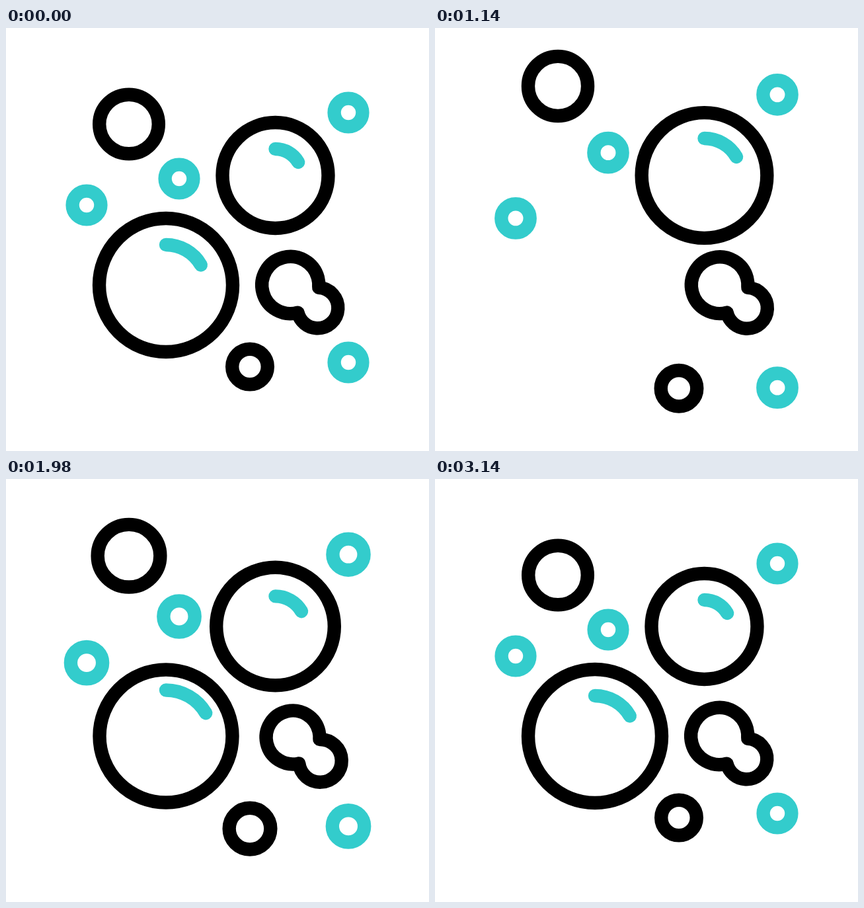
Write an HTML page with a canvas that moves like this. It is 640 px wide and 640 px high and loops after 3.6 s.

```html
<!DOCTYPE html>
<html lang="en">
<head>
<meta charset="utf-8">
<title>Bubbles</title>
<style>
  html, body { margin: 0; width: 100%; height: 100%; overflow: hidden; background: #fff; }
  canvas { display: block; width: 100vw; height: 100vh; }
</style>
</head>
<body>
<canvas id="stage" width="640" height="640"></canvas>
<script>
const ctx = document.getElementById('stage').getContext('2d');
const LOOP = 3600, STEP = 20, STROKE = 20.4;
const BLACK = '#000', TEAL = '#33cccc';
const RAD = Math.PI / 180;

// Eased value between [time, value] keys, held outside them
function track(t, keys) {
  if (t <= keys[0][0]) return keys[0][1];
  for (let i = 1; i < keys.length; i++) {
    const [t0, a] = keys[i - 1], [t1, b] = keys[i];
    if (t < t1) {
      const s = (t - t0) / (t1 - t0);
      return a + (b - a) * s * s * (3 - 2 * s);
    }
  }
  return keys[keys.length - 1][1];
}

const DRIFT = [[260, 0], [940, 1], [1660, 0], [2385, 1], [3110, 0]];
const SWELL = [[280, 0], [711, 1], [1187, 0], [1664, 1], [2140, 0], [2618, 1], [3115, 0]];

// Small rings: centre, path radius, vertical travel, growth
const rings = [
  { x: 186, y: 145.5, r: 44.8, dy: -71, grow: 9.7, color: BLACK },
  { x: 369, y: 512.5, r: 26.8, dy: 40.3, grow: 17.3, color: BLACK },
  { x: 518, y: 128, r: 21.4, dy: -33.5, grow: 8.3, color: TEAL },
  { x: 262, y: 228, r: 21.4, dy: -48.5, grow: 8.6, color: TEAL },
  { x: 122, y: 268, r: 21.4, dy: 24.5, grow: 10.4, color: TEAL },
  { x: 518, y: 506, r: 21.4, dy: 47, grow: 10.6, color: TEAL }
];

// Large bubbles: swell, burst into dots, then grow back
const bubbles = [
  { x: 242, y: 389, r: 101, shine: 61, start: 280, burst: 640, gone: 1010, spread: [119, 216], back: 1500,
    ring: [[1500, 0], [1740, 1.14], [1970, 0.995], [2060, 1]] },
  { x: 407.5, y: 223, r: 80, shine: 40, start: 735, burst: 1180, gone: 1570, spread: [95, 178], back: 1680,
    ring: [[1680, 0], [1930, 1.13], [2180, 1]] }
];
const SHINE_BACK = [[1600, 0], [1900, 1.17], [2200, 1]];
const DOT_ANGLES = [-96, -67, -38, -10.5, 15.5, 41, 67, 93.5, 120, 146, 172, 198.5, 226];
const SQUASH = 1.142;

function outline(color) {
  ctx.fillStyle = '#fff';
  ctx.fill();
  ctx.strokeStyle = color;
  ctx.stroke();
}

function circle(x, y, r, color) {
  ctx.beginPath();
  ctx.arc(x, y, r, 0, 2 * Math.PI);
  outline(color);
}

function drawDots(b, t) {
  const rx = b.spread[0] + (b.spread[1] - b.spread[0]) * (t - b.burst) / (b.gone - b.burst);
  ctx.fillStyle = BLACK;
  for (const a of DOT_ANGLES) {
    ctx.beginPath();
    ctx.ellipse(b.x + rx * Math.cos(a * RAD), b.y - 1 + rx / SQUASH * Math.sin(a * RAD),
      13.7, 11.7, 0, 0, 2 * Math.PI);
    ctx.fill();
  }
}

function drawBubble(b, t) {
  if (t >= b.burst && t < b.back) {
    if (t < b.gone) drawDots(b, t);
    return;
  }
  const before = t < b.burst;
  const swell = track(t, [[b.start, 0], [b.burst, 1]]);
  const size = before ? 1 + 0.19 * swell : track(t, b.ring);
  const shine = before ? 1 + 0.41 * swell : track(t, SHINE_BACK);
  if (size > 0) circle(b.x, b.y, b.r * size, BLACK);
  if (shine > 0) {
    ctx.beginPath();
    ctx.arc(b.x, b.y, b.shine * shine, -90 * RAD, -30 * RAD);
    ctx.strokeStyle = TEAL;
    ctx.stroke();
  }
}

// Outline of two overlapping circles whose sizes trade places
function drawTwin(k) {
  const x1 = 430.3 + 14.3 * k, y1 = 389 + 7.3 * k, r1 = 43.1 - 10 * k;
  const x2 = 471.5 + 14.7 * k, y2 = 423.5 + 10.7 * k, r2 = 30.8 + 6 * k;
  const d = Math.hypot(x2 - x1, y2 - y1);
  const dir = Math.atan2(y2 - y1, x2 - x1);
  const a1 = Math.acos((d * d + r1 * r1 - r2 * r2) / (2 * d * r1));
  const a2 = Math.acos((d * d + r2 * r2 - r1 * r1) / (2 * d * r2));
  ctx.beginPath();
  ctx.arc(x1, y1, r1, dir + a1, dir - a1 + 2 * Math.PI);
  ctx.arc(x2, y2, r2, dir + Math.PI + a2, dir + 3 * Math.PI - a2);
  ctx.closePath();
  outline(BLACK);
}

function draw(t) {
  ctx.fillStyle = '#fff';
  ctx.fillRect(0, 0, 640, 640);
  ctx.lineWidth = STROKE;
  ctx.lineCap = ctx.lineJoin = 'round';
  const drift = track(t, DRIFT), swell = track(t, SWELL);
  for (const b of bubbles) drawBubble(b, t);
  drawTwin(swell);
  for (const o of rings) circle(o.x, o.y + o.dy * drift, o.r + o.grow * swell, o.color);
}

const begin = performance.now();
function tick() {
  const t = (performance.now() - begin) % LOOP;
  draw(Math.floor(t / STEP) * STEP);
  requestAnimationFrame(tick);
}
tick();
</script>
</body>
</html>
```
